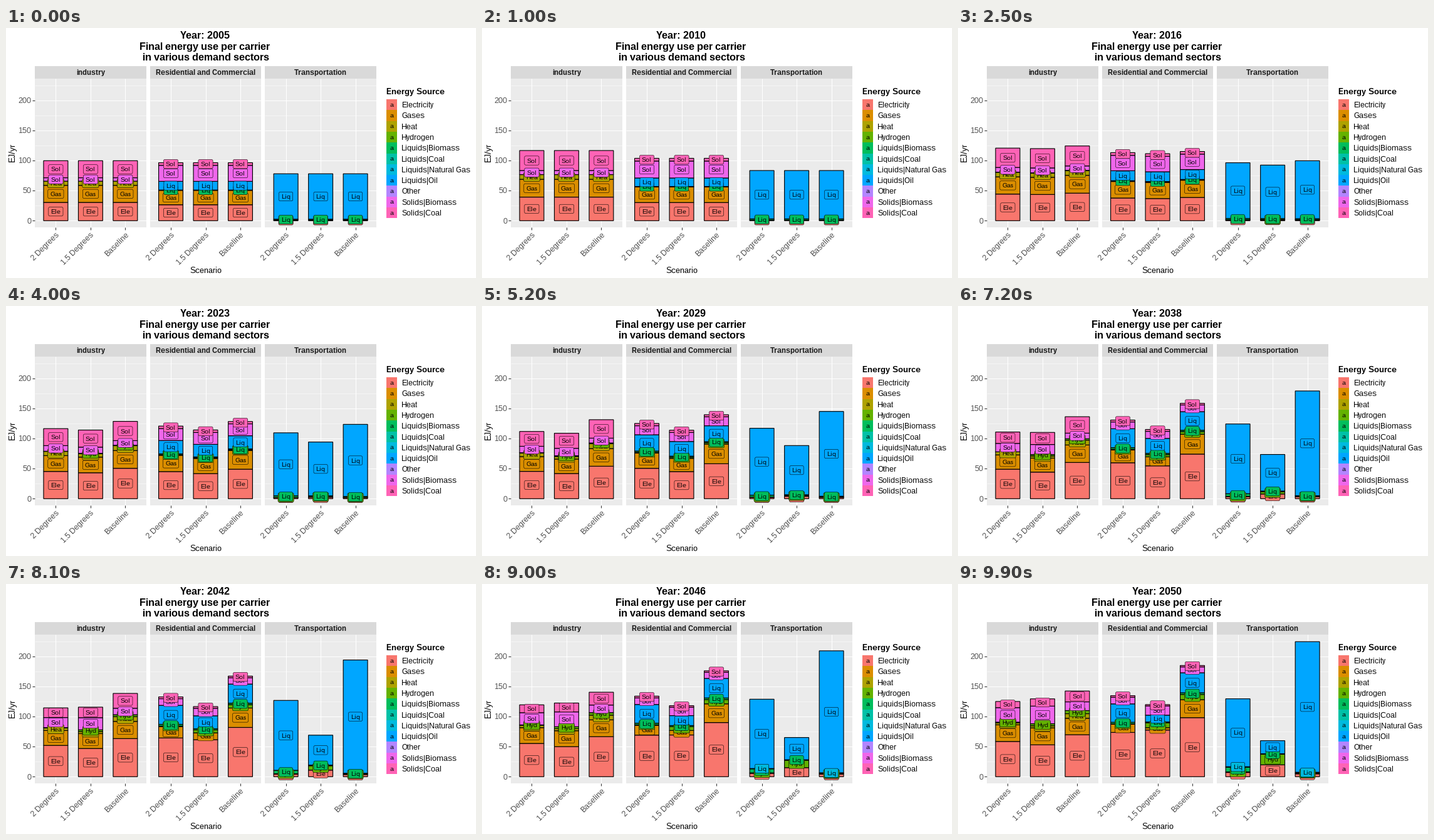
Write a matplotlib script that moves like this. It is 750x400 px and loops after 10000 ms.

```python
import numpy as np
import matplotlib.pyplot as plt
from matplotlib.animation import FuncAnimation
from matplotlib.patches import FancyBboxPatch, Rectangle

plt.rcParams.update({
    "font.family": "Liberation Sans",
    "text.hinting": "native",
    "text.hinting_factor": 1,
    "toolbar": "None",
})

W, H, FRAMES = 750, 400, 100
YEARS = np.linspace(2005, 2050, FRAMES)
STEPS = np.arange(2005, 2051, 5)        # motion is linear between these years
KEYS = np.array([2005, 2010, 2035, 2050])

SCENARIOS = ["2 Degrees", "1.5 Degrees", "Baseline"]
SOURCES = {
    "Electricity": "#F8766D", "Gases": "#DB8E00", "Heat": "#AEA200",
    "Hydrogen": "#64B200", "Liquids|Biomass": "#00BD5C",
    "Liquids|Coal": "#00C1A7", "Liquids|Natural Gas": "#00BADE",
    "Liquids|Oil": "#00A6FF", "Other": "#B385FF",
    "Solids|Biomass": "#EF67EB", "Solids|Coal": "#FF63B6",
}
NAMES = list(SOURCES)

# Per source: baseline EJ/yr at KEYS, then the share of the baseline that
# the 2 and 1.5 degree scenarios reach in 2035 and 2050.
SECTORS = {
    "industry": {
        "Electricity": ([30.4, 40.1, 58.2, 69.7], [.81, .84], [.73, .76]),
        "Gases": ([28.4, 29.7, 29.2, 27.4], [.80, 1.01], [.78, 1.03]),
        "Heat": ([6.9, 7.9, 8.1, 7.6], [.67, .45], [.43, .45]),
        "Hydrogen": ([0, 0, 1.9, 5.2], [0, .2], [1.05, .65]),
        "Solids|Biomass": ([5.7, 6.9, 8.5, 14.5], [1.47, 1.66], [1.75, 2.02]),
        "Solids|Coal": ([28.3, 33.7, 28.8, 18], [.72, .57], [.75, .67]),
    },
    "Residential and Commercial": {
        "Electricity": ([26.5, 30.6, 69.1, 98.1], [.82, .75], [.73, .79]),
        "Gases": ([23.9, 26.2, 33.4, 29.9], [.68, .46], [.52, .13]),
        "Hydrogen": ([0, 0, 3.6, 8.7], [.34, .06], [.83, .95]),
        "Liquids|Biomass": ([.6, .7, 2.1, 2.8], [1.26, .93], [1, .46]),
        "Liquids|Oil": ([14.4, 14, 30.2, 33.2], [1.03, .92], [.87, .34]),
        "Solids|Biomass": ([26.6, 28.3, 11.5, 9.8], [1, 1.13], [1, 1.57]),
        "Solids|Coal": ([4.4, 4.6, 2.9, 2.3], [1.15, 1.13], [1.15, .96]),
    },
    "Transportation": {
        "Electricity": ([.8, .9, 2.8, 4.7], [1, 1.49], [2.2, 4.2]),
        "Hydrogen": ([.3, .3, .6, .7], [1, 1.43], [3.6, 25]),
        "Liquids|Biomass": ([1.4, 1.9, 1.2, 1], [3.1, 7.7], [1, .9]),
        "Liquids|Natural Gas": ([0, 0, 0, 1], [1, .9], [0, 0]),
        "Liquids|Oil": ([75.5, 80.8, 164.6, 217], [.7, .52], [.41, .1]),
    },
}


def smooth(values):
    """Monotone cubic through the key years, sampled at STEPS."""
    v = np.array(values, float)
    h = np.diff(KEYS)
    d = np.diff(v) / h
    same = d[:-1] * d[1:] > 0
    total = np.where(same, d[:-1] + d[1:], 1)
    inner = np.where(same, 2 * d[:-1] * d[1:] / total, 0)
    m = np.concatenate([d[:1], inner, d[-1:]])
    k = np.clip(np.searchsorted(KEYS, STEPS, "right") - 1, 0, len(h) - 1)
    u = (STEPS - KEYS[k]) / h[k]
    ease = u * u * (3 - 2 * u)
    bend = u * (1 - u) * ((1 - u) * m[k] - u * m[k + 1]) * h[k]
    return v[k] + (v[k + 1] - v[k]) * ease + bend


def amounts(base, *shares):
    """Amounts per frame for each scenario in the order of SCENARIOS."""
    ratios = [smooth([1, 1, *share]) for share in shares] + [1]
    return [np.interp(YEARS, STEPS, smooth(base) * r) for r in ratios]


SCALE = 0.9627


def ypix(value):
    return 308.3 - SCALE * value


fig = plt.figure(figsize=(W / 72, H / 72), dpi=72, facecolor="white")
ax = fig.add_axes([0, 0, 1, 1])
ax.set(xlim=(0, W), ylim=(H, 0))
ax.axis("off")


def text(x, y, s, size=12, color="black", ha="left", **kw):
    return ax.text(x, y, s, fontsize=size, color=color, ha=ha,
                   va="baseline", **kw)


def box(x, y, w, h, color, z=1):
    ax.add_patch(Rectangle((x, y), w, h, fc=color, ec="none", lw=0, zorder=z))


def line(xs, ys, color, lw=1.07):
    ax.plot(xs, ys, color=color, lw=lw, zorder=2, solid_capstyle="butt")


LEFT, PANEL_W, PITCH, TOP, BOTTOM = 46.1, 177.6, 183.6, 81, 319
UNIT = PANEL_W / 3.2
BAR = 0.7 * UNIT
TAG_H = 14.4


class Segment:
    """One coloured part of a stacked bar with its label."""

    def __init__(self, x, name, values, bases):
        self.values, self.bases = values, bases
        color, z = SOURCES[name], 5 + NAMES.index(name)
        self.rect = Rectangle((x - BAR / 2, 0), BAR, 0, fc=color, ec="black",
                              lw=1.15, zorder=4, snap=False)
        self.text = text(x, 0, name[:3], 10, ha="center", zorder=z + 0.5)
        w = self.text.get_window_extent().width + 7.2
        self.tag = FancyBboxPatch(
            (x - w / 2, 0), w, TAG_H, fc=color, ec="black", lw=0.55,
            boxstyle="round,pad=0,rounding_size=2.16", zorder=z)
        ax.add_patch(self.rect)
        ax.add_patch(self.tag)

    def update(self, i):
        value, base = self.values[i], self.bases[i]
        self.rect.set_y(ypix(base))
        self.rect.set_height(-SCALE * value)
        self.rect.set_visible(value > 0.05)
        mid = ypix(base + value / 2)
        self.tag.set_y(mid - TAG_H / 2)
        self.text.set_y(mid + 3.5)
        for part in (self.tag, self.text):
            part.set_visible(value > 0.4)


segments = []
for n, (title, sources) in enumerate(SECTORS.items()):
    left = LEFT + PITCH * n
    right = left + PANEL_W
    box(left, 61, PANEL_W, 20, "#D9D9D9")
    box(left, TOP, PANEL_W, BOTTOM - TOP, "#EBEBEB")
    text(left + PANEL_W / 2, 75, title, 12, "#1A1A1A", "center",
         weight="bold")
    for v in range(0, 226, 25):
        line([left, right], [ypix(v)] * 2, "white", 0.53 if v % 50 else 1.07)

    centers = left + (np.arange(3) + 0.6) * UNIT
    for x, scenario in zip(centers, SCENARIOS):
        line([x, x], [TOP, BOTTOM], "white")
        line([x, x], [BOTTOM, BOTTOM + 3.7], "#333333")
        text(x + 6.1, 331.8, scenario, 12, "#4D4D4D", "right",
             rotation=45, rotation_mode="anchor")

    stack = np.zeros((3, FRAMES))
    for name, paths in sources.items():
        parts = amounts(*paths)
        for x, part, base in zip(centers, parts, stack):
            segments.append(Segment(x, name, part, base.copy()))
        stack += parts

for v in range(0, 201, 50):
    line([LEFT - 3.7, LEFT], [ypix(v)] * 2, "#333333")
    text(40.5, ypix(v) + 4.3, str(v), 12, "#4D4D4D", "right")

text(318.5, 392, "Scenario", 13, ha="center")
text(14, 199, "EJ/yr", 13, ha="center", rotation=90, rotation_mode="anchor")

year = text(317, 17, "", 16, ha="center", weight="bold")
text(317, 35, "Final energy use per carrier", 16, ha="center", weight="bold")
text(319, 52, "in various demand sectors", 16, ha="center", weight="bold")

text(607, 106, "Energy Source", 13, weight="bold")
KEY = 17.28
for k, (name, color) in enumerate(SOURCES.items()):
    y = 114.2 + KEY * k
    box(607.2, y, KEY, KEY, color)
    text(607.2 + KEY / 2, y + 11.6, "a", 10, ha="center")
    text(631, y + 13, name)


def update(i):
    year.set_text(f"Year: {YEARS[i]:.0f}")
    for segment in segments:
        segment.update(i)
    return []


anim = FuncAnimation(fig, update, frames=FRAMES, interval=100,
                     init_func=lambda: update(0), repeat=True,
                     repeat_delay=0, blit=False)
plt.show()
```
